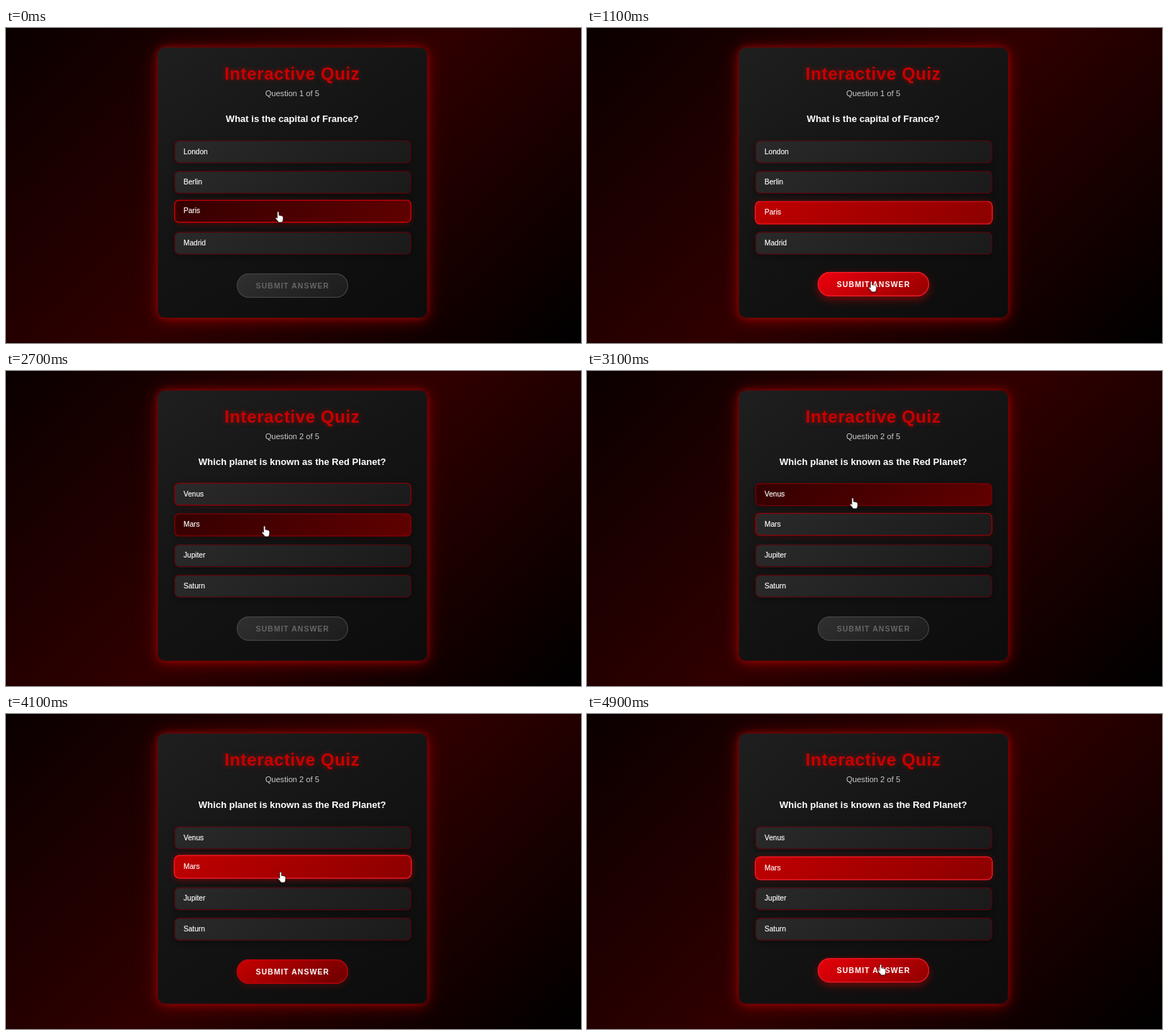
These frames come from a looping animation (800 px wide and 439 px high, 5 s). An HTML page:

```html
<!DOCTYPE html>
<html lang="en">
<head>
<meta charset="utf-8">
<title>Interactive Quiz</title>
<style>
html, body { margin: 0; width: 100%; height: 100%; overflow: hidden; background: #000; }
body { position: relative; font-family: "Liberation Sans", Arial, sans-serif; color: #fff; }
#stage { position: absolute; left: 0; top: 0; width: 800px; height: 439px; overflow: hidden;
  background: linear-gradient(135deg, #0a0000, #300000 50%, #000); }
#stage div, #stage svg { position: absolute; left: 0; top: 0; }
#stage #card { left: 211px; top: 27px; width: 374.5px; height: 377px; border-radius: 10px;
  background: linear-gradient(145deg, #1f1f1f, #141414 45%, #0c0c0c);
  box-shadow: inset 0 0 0 1px rgba(139,0,0,.2), 0 0 8px rgba(190,0,0,.6), 0 3px 19px rgba(200,0,0,.48), 0 0 38px rgba(139,0,0,.22); }
#stage .line { left: 211px; width: 374.5px; text-align: center; white-space: nowrap; line-height: 30px; }
#stage #title { top: 48.5px; font-size: 24px; font-weight: bold; letter-spacing: .6px; color: #c80000;
  text-shadow: 0 0 7px rgba(220,0,0,.55); }
#stage #count { top: 75.5px; font-size: 11.1px; color: #ccc; }
#stage #ask { top: 111.5px; font-size: 13.05px; font-weight: bold; }
.option { width: 329.5px; height: 32px; }
.option div, #button div { width: 100%; height: 100%; border-radius: 7px; }
.base { background: linear-gradient(145deg, #2a2a2a, #1a1a1a);
  box-shadow: inset 0 0 0 1.3px #560008, 0 2px 7px rgba(0,0,0,.4); }
.fill { background: linear-gradient(145deg, #330000, #620000); box-shadow: inset 0 0 0 1.3px #6c0004; }
.edge { box-shadow: inset 0 0 0 1.3px #cc0008, 0 2px 9px rgba(255,0,0,.25); }
.pick { background: linear-gradient(145deg, #c00000, #8b0000);
  box-shadow: inset 0 0 0 .8px #ff1c28, 0 0 0 .5px #ff1c28, 0 0 11px rgba(255,0,0,.28); }
.option .text { text-indent: 13px; font-size: 10.1px; line-height: 32px; -webkit-text-stroke: .15px; }
#button { width: 154.5px; height: 34px; }
#button div { border-radius: 17px; }
#button .base { background: linear-gradient(145deg, #303030, #1c1c1c); box-shadow: inset 0 0 0 1.2px #424242; }
#button .pick { background: linear-gradient(145deg, #c80000, #6a0000);
  box-shadow: inset 0 0 0 1.2px #c4000c, 0 3px 10px rgba(255,0,0,.2); }
#button .edge { background: linear-gradient(145deg, #ec000c, #940000);
  box-shadow: inset 0 0 0 1.2px #f0202c, 0 5px 14px rgba(255,0,0,.28); }
#button .text { text-align: center; text-indent: 1px; font-size: 10.5px; font-weight: bold; letter-spacing: 1px; line-height: 34px; }
#hand { filter: drop-shadow(0 1px 1px rgba(0,0,0,.5)); }
</style>
</head>
<body>
<div id="stage">
  <div id="card"></div>
  <div id="title" class="line">Interactive Quiz</div>
  <div id="count" class="line"></div>
  <div id="ask" class="line"></div>
  <svg id="hand" width="13" height="17" viewBox="0 0 13 17">
    <path d="M3 9V1.7a1.1 1.1 0 0 1 2.2 0V5.6l4.2.8q1.6.4 1.6 2V10.4q0 2.8-1.5 4.8H4.8Q3.2 12.4 .9 10.4q-.8-1 .2-1.5.9-.4 1.9.8z"
      fill="#fff" stroke="#222" stroke-width=".5"/>
  </svg>
</div>
<script>
const LOOP = 5000, FRAME = 100, FADE = 300, LIFT = 2;
const quiz = [
  { ask: "What is the capital of France?", options: ["London", "Berlin", "Paris", "Madrid"],
    answer: 2, click: 200, end: 1300 },
  { ask: "Which planet is known as the Red Planet?", options: ["Venus", "Mars", "Jupiter", "Saturn"],
    answer: 1, click: 3700, end: LOOP }
];

// Stops of the pointer: time, x, y
const path = [
  [0, 380, 263], [400, 382, 264], [700, 395, 355], [1100, 397, 360], [1300, 396, 359], [1900, 329, 200],
  [2300, 342, 182], [2700, 361, 223], [3100, 371, 184], [3500, 380, 234], [4200, 384, 226],
  [4400, 396, 303], [4550, 402, 352], [4900, 410, 356]
];

function pointer(t) {
  const i = path.findIndex(p => p[0] > t);
  if (i < 1) return i ? path[path.length - 1].slice(1) : path[0].slice(1);
  const a = path[i - 1], b = path[i], k = (t - a[0]) / (b[0] - a[0]);
  return [1, 2].map(c => a[c] + (b[c] - a[c]) * k);
}

const $ = id => document.getElementById(id);

function makeBox(cls, id, x, y, height) {
  const el = document.createElement("div");
  el.className = cls;
  el.id = id;
  el.innerHTML = ["base", "fill", "edge", "pick", "text"].map(c => `<div class="${c}"></div>`).join("");
  $("stage").insertBefore(el, $("hand"));
  const part = c => el.querySelector("." + c);
  return { el, part, x, y, height, show: (c, v) => part(c).style.opacity = v };
}

const options = [0, 1, 2, 3].map(i => makeBox("option", "option" + i, 234, 156.5 + 42.45 * i, 32));
const button = makeBox("", "button", 321, 342, 34);
button.part("text").textContent = "SUBMIT ANSWER";
button.el.append(button.part("edge"), button.part("text"));

// The page answers one frame after the pointer
function isOver(box, t) {
  const tip = pointer(t - FRAME)[1] - 7;
  return tip >= box.y && tip <= box.y + box.height;
}

// Hover that fades in and out: the share of the last FADE ms spent over the box
function glow(box, t) {
  let n = 0;
  for (let d = 0; d < FADE; d += 10) n += isOver(box, t - d);
  return n * 10 / FADE;
}

function place(box, lift) {
  box.el.style.transform = `translate(${box.x}px,${box.y - LIFT * lift}px)`;
}

function draw(t) {
  const n = quiz.findIndex(q => t < q.end), q = quiz[n], picked = t >= q.click;
  $("count").textContent = `Question ${n + 1} of 5`;
  $("ask").textContent = q.ask;
  options.forEach((box, i) => {
    const hover = glow(box, t);
    box.part("text").textContent = q.options[i];
    box.show("fill", +isOver(box, t));
    box.show("edge", hover);
    box.show("pick", +(picked && i === q.answer));
    place(box, hover);
  });
  const hover = picked ? glow(button, t) : 0;
  button.show("fill", 0);
  button.show("pick", +picked);
  button.show("edge", hover);
  button.el.style.color = picked ? "#fff" : "#666";
  place(button, hover);
  const [x, y] = pointer(t);
  $("hand").style.transform = `translate(${x - 5.5}px,${y - 7.5}px)`;
}

const start = performance.now();
function tick() {
  const t = (performance.now() - start) % LOOP;
  draw(Math.floor(t / FRAME) * FRAME);
  requestAnimationFrame(tick);
}
tick();
</script>
</body>
</html>
```
